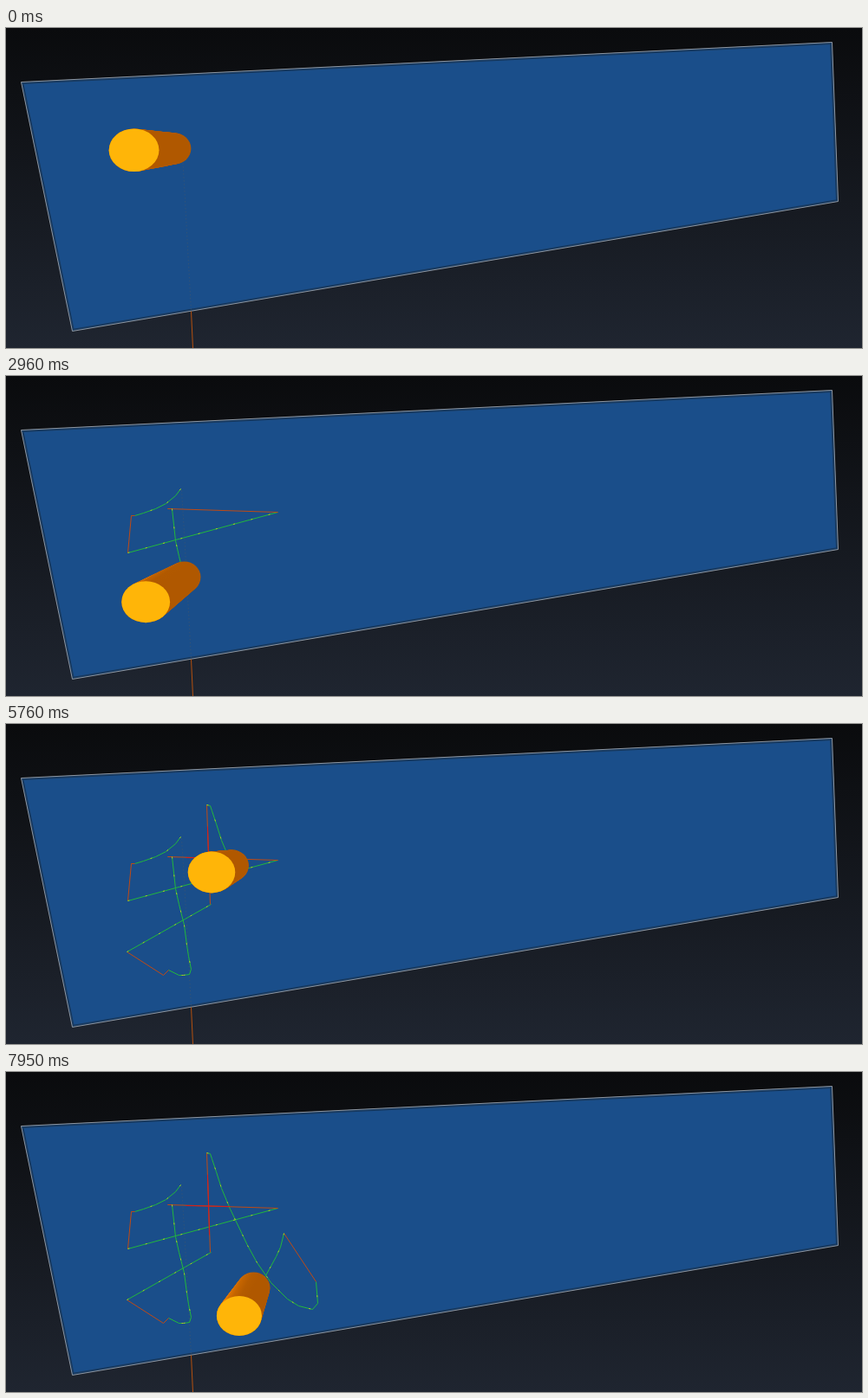
An HTML page with a canvas for the animation above (8000 ms loop, 987x370 px).

```html
<!DOCTYPE html>
<html lang="en">
<head>
<meta charset="utf-8">
<title>Milling path</title>
<style>
html, body { margin: 0; width: 100%; height: 100%; overflow: hidden; background: #14171d; }
canvas { display: block; width: 987px; height: 370px; }
</style>
</head>
<body>
<canvas id="stage" width="987" height="370"></canvas>
<script>
const ctx = document.getElementById('stage').getContext('2d');
const LOOP = 8000, STEP = 78, LAST = 102;
const GREEN = '#22b83c', RED = '#c04a14';

// Each move: colour, first step, last step, points on the plate
const moves = [
  [GREEN, -1, 4.5, '201,130 195,138 184,147 172,153 158,158 148,161'],
  [RED, 4.5, 8.6, '148,161 144,161 140,204'],
  [GREEN, 8.6, 21, '140,204 313,157'],
  [RED, 22, 32.3, '313,157 186,153 191,153'],
  [GREEN, 32.3, 38, '191,153 195,190 199,208 205,232'],
  [GREEN, 38, 44, '205,232 208,255 210,268 213,283 211,289 204,290'],
  [GREEN, 44, 45.6, '204,290 199,290 187,284'],
  [RED, 45.6, 49.5, '187,284 181,290 139,263'],
  [GREEN, 49.5, 58, '139,263 206,225 236,208'],
  [RED, 58, 67.2, '235,208 231,93'],
  [GREEN, 68.3, 77, '231,93 235,94 237,100 242,115 248,134 258,158 278,200'],
  [GREEN, 77, 88, '278,200 289,220 305,243 324,262 337,270 353,274 359,267 357,242'],
  [RED, 88.7, 97, '357,242 320,186'],
  [GREEN, 97, 102, '320,186 316,202 311,213 299,235 285,249']
].map(([color, from, to, text]) => {
  const points = text.split(' ').map(p => p.split(',').map(Number));
  return { color, from, to, points };
});

const mix = (a, b, t) => a + (b - a) * t;
const clamp = v => Math.min(1, Math.max(0, v));
const distance = (a, b) => Math.hypot(b[0] - a[0], b[1] - a[1]);

// The first part of a polyline, measured by length
function cut(points, part) {
  let total = 0;
  for (let i = 1; i < points.length; i++) total += distance(points[i - 1], points[i]);
  let left = total * part;
  const out = [points[0]];
  for (let i = 1; i < points.length; i++) {
    const a = points[i - 1], b = points[i], d = distance(a, b);
    if (left < d) {
      out.push([mix(a[0], b[0], left / d), mix(a[1], b[1], left / d)]);
      break;
    }
    out.push(b);
    left -= d;
  }
  return out;
}

function trace(points, closed) {
  ctx.beginPath();
  points.forEach(([x, y]) => ctx.lineTo(x + .5, y + .5));
  if (closed) ctx.closePath();
}

function line(points, color, dash = [], width = 1) {
  trace(points);
  ctx.strokeStyle = color;
  ctx.lineWidth = width;
  ctx.setLineDash(dash);
  ctx.stroke();
  ctx.setLineDash([]);
}

function drawScene() {
  const sky = ctx.createLinearGradient(0, 0, 0, 370);
  sky.addColorStop(0, '#0a0b0d');
  sky.addColorStop(1, '#1f2530');
  ctx.fillStyle = sky;
  ctx.fillRect(0, 0, 987, 370);

  trace([[17, 62], [952, 16], [959, 200], [76, 350]], true);
  ctx.fillStyle = '#1a4e8a';
  ctx.fill();
  ctx.save();
  ctx.clip();
  ctx.strokeStyle = '#183a60';
  ctx.lineWidth = 5;
  ctx.stroke();
  ctx.restore();
  ctx.strokeStyle = '#8e959e';
  ctx.lineWidth = 1;
  ctx.stroke();

  line([[202, 132], [205, 180], [213, 327]], '#3d5570', [1, 3]);
  line([[213, 327], [215, 370]], '#b4500f');
}

function drawTrail(step) {
  let tip;
  for (const { color, from, to, points } of moves) {
    if (step < from) break;
    const done = cut(points, clamp((step - from) / (to - from)));
    line(done, color);
    if (color === GREEN) line(done, '#b9c229', [2, 19]);
    tip = done[done.length - 1];
  }
  if (step > 66) {
    line([[207, 154], [258, 155]], '#dc1a18');
    line([[232, 118], [234, 188]], '#dc1a18');
  }
  return tip;
}

function ellipse(x, y, rx, ry) {
  ctx.beginPath();
  ctx.ellipse(x + .5, y + .5, rx, ry, 0, 0, 7);
  ctx.fill();
}

function sideColor(nx) {
  const lit = clamp((.3 - nx) / 1.3) ** 1.5;
  return `rgb(${mix(176, 240, lit)},${mix(88, 126, lit)},0)`;
}

function drawTool([x, y]) {
  const px = x - 260, py = y - 160;
  const dx = -24 + .35 * px - .015 * py;
  const dy = 7 + .29 * py - .015 * px;
  const rx = 27.3 - .022 * px - .008 * py;
  const ry = 24 - .01 * px - .008 * py;

  const len = Math.hypot(dx, dy), ux = dx / len, uy = dy / len;
  const cx = x + dx / 2, cy = y + dy / 2, r = 22;
  const side = ctx.createLinearGradient(cx - uy * r, cy + ux * r, cx + uy * r, cy - ux * r);
  for (let i = 0; i <= 8; i++) {
    const a = Math.PI * i / 8;
    side.addColorStop((1 - Math.cos(a)) / 2, sideColor(-uy * Math.cos(a) - ux * Math.sin(a)));
  }
  ctx.fillStyle = side;
  for (let i = 0; i <= 40; i++) {
    const t = i / 40;
    ellipse(x + dx * t, y + dy * t, mix(19, rx, t), mix(18, ry, t));
  }
  ctx.fillStyle = '#ffb508';
  ellipse(x + dx, y + dy, rx, ry);
}

function frame(now) {
  const time = now % LOOP;
  const step = Math.min(LAST, Math.floor((time + 18) / STEP));
  drawScene();
  drawTool(drawTrail(step));
  requestAnimationFrame(frame);
}
frame(0);
</script>
</body>
</html>
```
